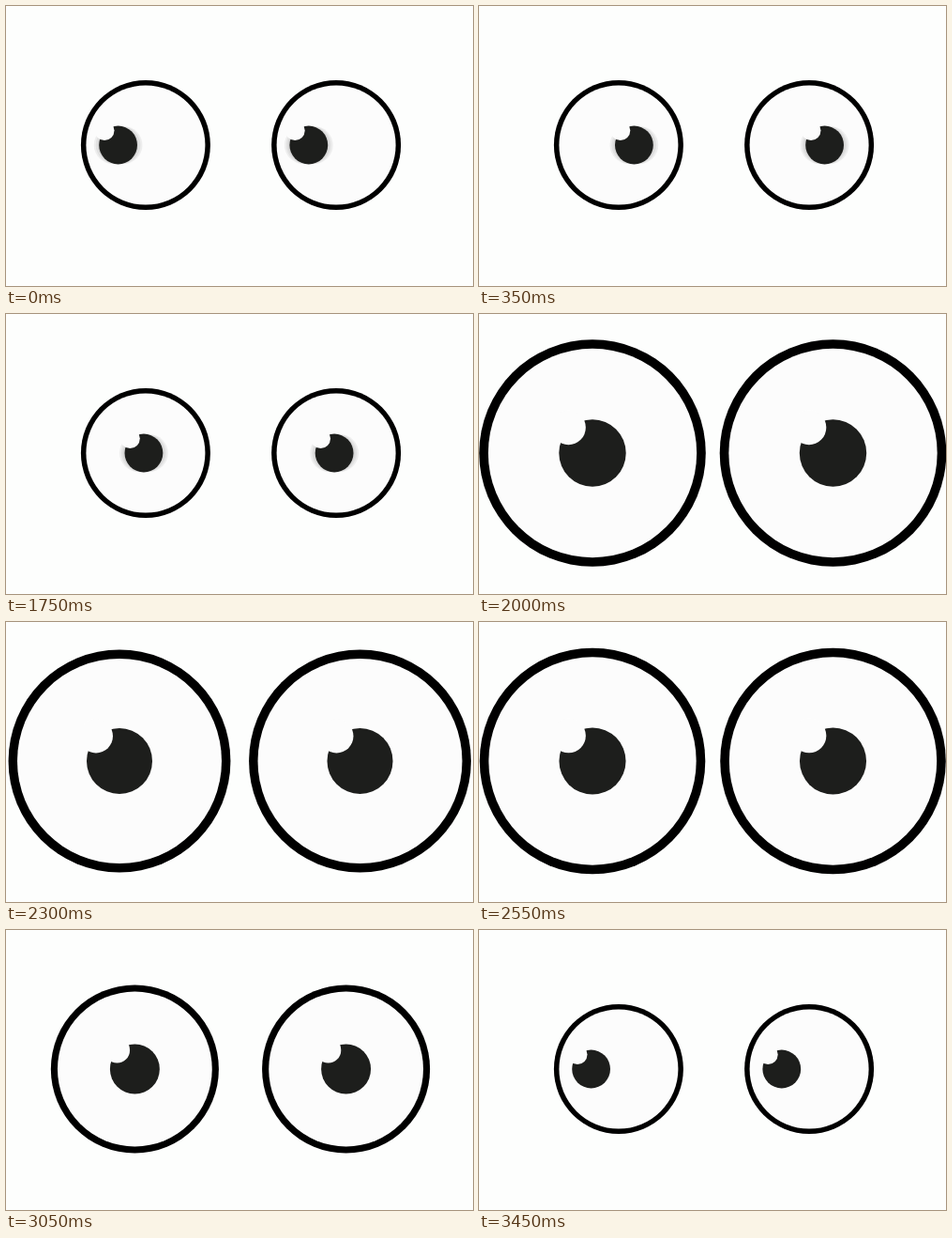
An HTML page with a canvas for the animation above (3.7 s loop, 498 px wide and 298 px high).

```html
<!DOCTYPE html>
<html lang="en">
<head>
<meta charset="utf-8">
<title>Eyes</title>
<style>
html, body { margin: 0; width: 100%; height: 100%; overflow: hidden; background: #fdfefd; }
canvas { display: block; }
</style>
</head>
<body>
<canvas id="stage" width="498" height="298"></canvas>
<script>
const ctx = document.getElementById("stage").getContext("2d");
const LOOP = 3700, STEP = 50;
const WHITE = "#fcfcfc", INK = "#1d1e1c";
const LEFT = -29.3, RIGHT = 36.7;

const progress = (t, from, to) => Math.min(1, Math.max(0, (t - from) / (to - from)));
const ease = p => (1 - Math.cos(Math.PI * p)) / 2;
const mix = (a, b, p) => a + (b - a) * p;

// Each glance: start, end, pupil offset before and after
const glances = [
  [10, 500, LEFT, RIGHT],
  [770, 1250, RIGHT, LEFT],
  [1475, 1770, LEFT, 0],
  [3160, 3450, 0, LEFT]
];

function disc(x, y, r, color) {
  ctx.fillStyle = color;
  ctx.beginPath();
  ctx.arc(x, y, r, 0, 2 * Math.PI);
  ctx.fill();
}

function drawEye(x, y, radius, look, moving) {
  const s = radius / 69;
  disc(x, y, radius, "#000");
  disc(x, y, radius - 5.5 * s, WHITE);

  const px = x + look * s, r = 20.4 * s;
  if (moving) {
    // Soft smear along the direction of travel
    ctx.globalAlpha = 0.06;
    for (const d of [-6, -4, -2, 2, 4, 6]) disc(px + d, y, r - 0.5, INK);
    ctx.globalAlpha = 1;
  }
  disc(px, y, r, INK);
  disc(px - 14.6 * s, y - 15.5 * s, 10.5 * s, WHITE);
}

function draw(t) {
  let look = LEFT, moving = false;
  for (const [start, end, a, b] of glances) {
    if (t < start && start > STEP) break;
    look = mix(a, b, progress(t, start, end));
    moving = t < end;
  }

  const grow = ease(progress(t, 1770, 2000)) - ease(progress(t, 2900, 3170));
  const wobble = 1.2 * Math.cos(2 * Math.PI * (t - 2000) / 650);
  const radius = 69 + grow * (50.6 + wobble);

  ctx.fillStyle = "#fdfefd";
  ctx.fillRect(0, 0, 498, 298);
  drawEye(mix(148.9, 121, grow), 148, radius, look, moving);
  drawEye(mix(352.1, 377.5, grow), 148, radius, look, moving);
}

const begin = performance.now();
function frame() {
  const t = (performance.now() - begin) % LOOP;
  draw(Math.floor(t / STEP) * STEP);
  requestAnimationFrame(frame);
}
frame();
</script>
</body>
</html>
```
